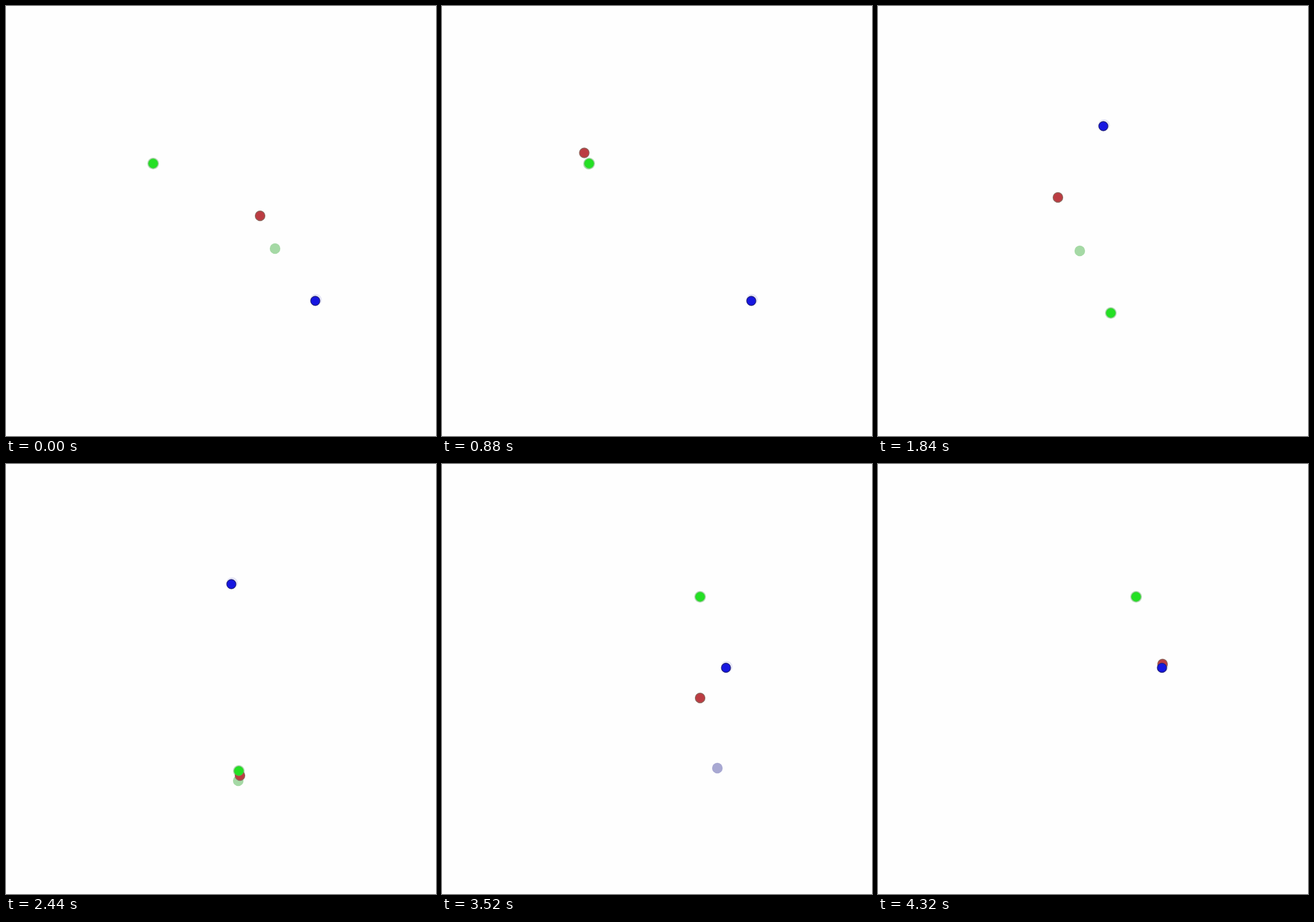
Animation, 748 px wide and 748 px high, one loop 4.36 s. Source, as an HTML page:

```html
<!DOCTYPE html>
<html lang="en">
<head>
<meta charset="utf-8">
<title>Pointing task</title>
<style>
  html, body { margin: 0; width: 100%; height: 100%; overflow: hidden; background: #fefefe; }
  svg { display: block; width: 100vw; height: 100vh; }
</style>
</head>
<body>
<svg viewBox="0 0 748 748">
  <!-- The halos lie below the moving dots. -->
  <g class="green"><circle r="10.2" fill="#bcdcbc"/></g>
  <g class="blue"><circle cx="1.2" cy="-1.8" r="10.2" fill="#e6e6f6"/></g>
  <g class="lead"><circle id="tint" r="9.2"/></g>
  <g class="hand"><circle r="8.5" fill="#bb3c42" stroke="#8c6a60" stroke-width="1.3"/></g>
  <g class="green"><circle r="8.3" fill="#24e024" stroke="#58c058" stroke-width="0.8"/></g>
  <g class="blue"><circle r="8" fill="#1616e0" stroke="#20207c" stroke-width="1.3"/></g>
</svg>
<script>
const LOOP = 4360, STEP = 40, SETTLE = 600;

// Both dots reach from a start to a landing point, then settle to rest.
const reach = (begin, span, from, land, rest = land, bow = 0) =>
  ({ begin, span, from, land, rest, bow });

const trials = [
  {
    start: 0, tint: "#a5d9a5", green: [256, 274], blue: [538, 513],
    lead: reach(40, 480, [468, 422], [255, 275]),
    hand: reach(320, 540, [442, 365], [247.5, 255.5], [258, 280])
  },
  {
    start: 1800, tint: "#a5d9a5", green: [405, 534], blue: [392, 209],
    lead: reach(1880, 400, [351, 426], [404, 552], [404, 544]),
    hand: reach(1900, 500, [313, 333], [407, 542], [410, 533])
  },
  {
    start: 3480, tint: "#a8a8d2", green: [449, 231], blue: [494, 354.5],
    lead: reach(3520, 400, [479, 529], [494, 354], [494, 354], 12),
    hand: reach(3880, 360, [449, 407], [495, 348])
  }
];

// Minimum-jerk profile of a hand movement.
function ease(t, begin, span) {
  const u = Math.min(1, Math.max(0, (t - begin) / span));
  return u * u * u * (10 - 15 * u + 6 * u * u);
}

function at({ begin, span, from, land, rest, bow }, t) {
  const go = ease(t, begin, span);
  const settle = ease(t, begin + span, SETTLE);
  const [x, y] = from.map((v, k) => v + (land[k] - v) * go + (rest[k] - land[k]) * settle);
  return [x + bow * Math.sin(Math.PI * go), y];
}

function place(name, [x, y]) {
  for (const g of document.getElementsByClassName(name))
    g.setAttribute("transform", `translate(${x} ${y})`);
}

function draw(ms) {
  const t = Math.floor(ms % LOOP / STEP) * STEP;
  const trial = trials.filter(s => s.start <= t).pop();
  place("green", trial.green);
  place("blue", trial.blue);
  place("lead", at(trial.lead, t));
  place("hand", at(trial.hand, t));
  document.getElementById("tint").setAttribute("fill", trial.tint);
}

const origin = performance.now();
function tick() {
  draw(performance.now() - origin);
  requestAnimationFrame(tick);
}
tick();
</script>
</body>
</html>
```
